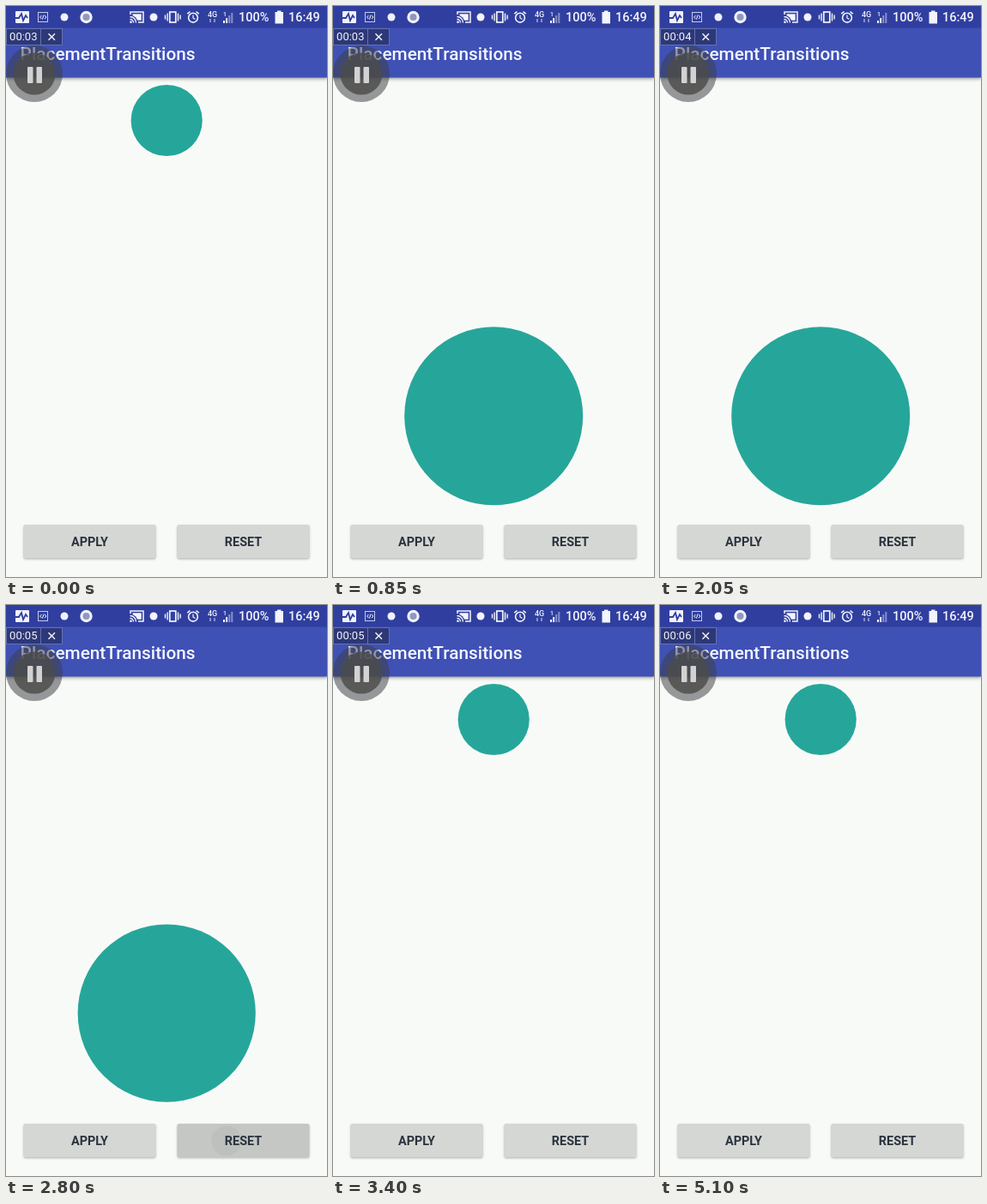
An HTML page with a canvas for the animation above (5350 ms loop, 374 by 666 pixels).

```html
<!DOCTYPE html>
<html lang="en">
<head>
<meta charset="utf-8">
<title>Layout transition</title>
<style>
  html, body { margin: 0; width: 100%; height: 100%; overflow: hidden; background: #f8faf8; }
  canvas { display: block; width: 374px; height: 666px; }
</style>
</head>
<body>
<canvas id="stage"></canvas>
<script>
const W = 374, H = 666, LOOP = 5350, STEP = 50;
const MOVE = 450;
const canvas = document.getElementById('stage');
const ctx = canvas.getContext('2d');
const ratio = window.devicePixelRatio || 1;
canvas.width = W * ratio;
canvas.height = H * ratio;
ctx.scale(ratio, ratio);

const buttons = [
  { label: 'APPLY', x: 20.5, width: 154, touchX: 137, press: 50 },
  { label: 'RESET', x: 199.5, width: 154, touchX: 257, press: 2650 }
];

const clamp = v => Math.max(0, Math.min(1, v));
const ease = v => (1 - Math.cos(Math.PI * clamp(v))) / 2;
const mix = (a, b, p) => a + (b - a) * p;

function rect(x, y, w, h, color, radius = 0) {
  ctx.fillStyle = color;
  ctx.beginPath();
  ctx.roundRect(x, y, w, h, radius);
  ctx.fill();
}

function disc(x, y, r, color) {
  ctx.fillStyle = color;
  ctx.beginPath();
  ctx.arc(x, y, r, 0, Math.PI * 2);
  ctx.fill();
}

function ring(x, y, r, width, color) {
  ctx.strokeStyle = color;
  ctx.lineWidth = width;
  ctx.beginPath();
  ctx.arc(x, y, r, 0, Math.PI * 2);
  ctx.stroke();
}

function line(points, width, color) {
  ctx.strokeStyle = color;
  ctx.lineWidth = width;
  ctx.beginPath();
  points.forEach(([x, y]) => ctx.lineTo(x, y));
  ctx.stroke();
}

function box(x, y, w, h, width, color) {
  ctx.strokeStyle = color;
  ctx.lineWidth = width;
  ctx.strokeRect(x, y, w, h);
}

function text(value, x, y, size, color, align = 'left', weight = 500) {
  ctx.font = `${weight} ${size}px Roboto, sans-serif`;
  ctx.textAlign = align;
  ctx.fillStyle = color;
  ctx.fillText(value, x, y);
}

function shadowed(color, blur, offset, draw) {
  ctx.save();
  ctx.shadowColor = color;
  ctx.shadowBlur = blur * ratio;
  ctx.shadowOffsetY = offset * ratio;
  draw();
  ctx.restore();
}

function drawNotifications() {
  const ink = '#f0f2fb', blue = '#303f9f';
  rect(11, 6, 16, 14, ink, 1);
  line([[11, 14], [15, 14], [18, 9], [20, 17], [23, 11], [25, 14]], 1.8, blue);
  box(37.5, 7.5, 11, 11, 1, '#c3c9e6');
  line([[41.5, 11], [39.5, 13], [41.5, 15]], 1, ink);
  line([[44, 10.5], [42.5, 15.5]], 1, ink);
  line([[45, 11], [47, 13], [45, 15]], 1, ink);
  disc(68, 13, 4.5, ink);
  disc(93.5, 13, 7.2, ink);
  disc(93.5, 13, 4, '#8f98bd');
}

function drawCast(ink, ground) {
  line([[145, 10], [145, 7], [160, 7], [160, 19], [154, 19]], 1.5, ink);
  rect(147.5, 9.3, 10.2, 7.4, ink);
  ctx.fillStyle = ground;
  ctx.beginPath();
  ctx.moveTo(144.5, 19.5);
  ctx.arc(144.5, 19.5, 9, -Math.PI / 2, 0);
  ctx.fill();
  ctx.strokeStyle = ink;
  ctx.lineWidth = 1.4;
  for (const r of [4, 7]) {
    ctx.beginPath();
    ctx.arc(144.5, 19.5, r, -Math.PI / 2, 0);
    ctx.stroke();
  }
  disc(145.5, 18.8, 1.3, ink);
}

function drawSystemIcons() {
  const ink = '#f3f4fc', dim = '#8791ca';
  drawCast(ink, '#303f9f');
  disc(172, 13, 4.5, ink);
  // Vibrate
  box(190.8, 7, 7, 12, 1.7, ink);
  for (const side of [-1, 1]) {
    line([[194.3 + side * 6.2, 8.5], [194.3 + side * 6.2, 17.5]], 1.4, ink);
    line([[194.3 + side * 8.8, 10.5], [194.3 + side * 8.8, 15.5]], 1.4, ink);
  }
  // Alarm
  ring(218, 13.7, 5.4, 1.6, ink);
  line([[218, 10.5], [218, 14], [220.5, 15.4]], 1.2, ink);
  line([[211.3, 9.2], [214.5, 6.5]], 1.6, ink);
  line([[224.7, 9.2], [221.5, 6.5]], 1.6, ink);
  // Network
  text('4G', 240.5, 12.5, 9, ink, 'center');
  rect(237, 15, 2, 4, dim);
  rect(242, 15, 2, 4, dim);
  text('1', 253, 12, 7, ink);
  for (let i = 0; i < 4; i++) rect(253 + i * 3.1, 17 - i * 3, 2, 3 + i * 3, i < 2 ? ink : dim);
  text('100%', 271, 18.3, 14.5, ink);
  // Battery
  rect(316, 5.5, 4.5, 2, ink);
  rect(313.5, 7, 9.5, 13.5, ink);
  text('16:49', 329, 18.3, 14.5, ink);
}

function drawHeader() {
  shadowed('rgba(0,0,0,.4)', 4, 1, () => rect(0, 25, W, 58.5, '#3f51b5'));
  rect(0, 0, W, 25.5, '#303f9f');
  drawNotifications();
  drawSystemIcons();
  text('PlacementTransitions', 16.6, 62.6, 20.8, '#f4f6ff');
}

function drawRecorder(t) {
  const seconds = 3 + [1250, 2700, 4250].filter(mark => t >= mark).length;
  disc(33, 79, 33, 'rgba(60,62,68,.52)');
  disc(33, 79, 24.5, 'rgba(76,76,74,.82)');
  rect(25, 71, 6.5, 19, '#d2d2d2', 1);
  rect(35.5, 71, 6.5, 19, '#d2d2d2', 1);
  rect(0, 26, 66, 20, 'rgba(34,40,80,.6)');
  box(.5, 26.5, 65, 19, 1, '#6471ae');
  line([[40.5, 26], [40.5, 46]], 1, '#6471ae');
  text('00:0' + seconds, 20.3, 40.2, 13, '#f2f3f7', 'center', 400);
  line([[49.5, 32.2], [57, 39.7]], 1.5, '#f2f3f7');
  line([[57, 32.2], [49.5, 39.7]], 1.5, '#f2f3f7');
}

function drawButton({ label, x, width, touchX, press }, t) {
  const y = 605, height = 39, age = t - press;
  shadowed('rgba(0,0,0,.28)', 2.5, 1.2, () => rect(x, y, width, height, '#d5d7d4', 2));
  if (age > 0 && age < 700) {
    const fade = clamp((700 - age) / 300);
    ctx.save();
    ctx.beginPath();
    ctx.roundRect(x, y, width, height, 2);
    ctx.clip();
    rect(x, y, width, height, `rgba(0,0,0,${.075 * clamp(age / 150) * fade})`);
    disc(touchX, 625, age * .118, `rgba(0,0,0,${.035 * fade})`);
    ctx.restore();
  }
  text(label, x + width / 2, 630, 14.4, '#29333d', 'center', 700);
}

function draw(t) {
  rect(0, 0, W, H, '#f8faf8');
  const progress = ease((t - 176) / MOVE) - ease((t - 2777) / MOVE);
  disc(187.2, mix(133.5, 478.3, progress), mix(41.6, 104, progress), '#26a69a');
  drawHeader();
  drawRecorder(t);
  buttons.forEach(button => drawButton(button, t));
}

const start = performance.now();
function tick() {
  const elapsed = (performance.now() - start) % LOOP;
  draw(Math.floor(elapsed / STEP) * STEP);
  requestAnimationFrame(tick);
}
tick();
</script>
</body>
</html>
```
